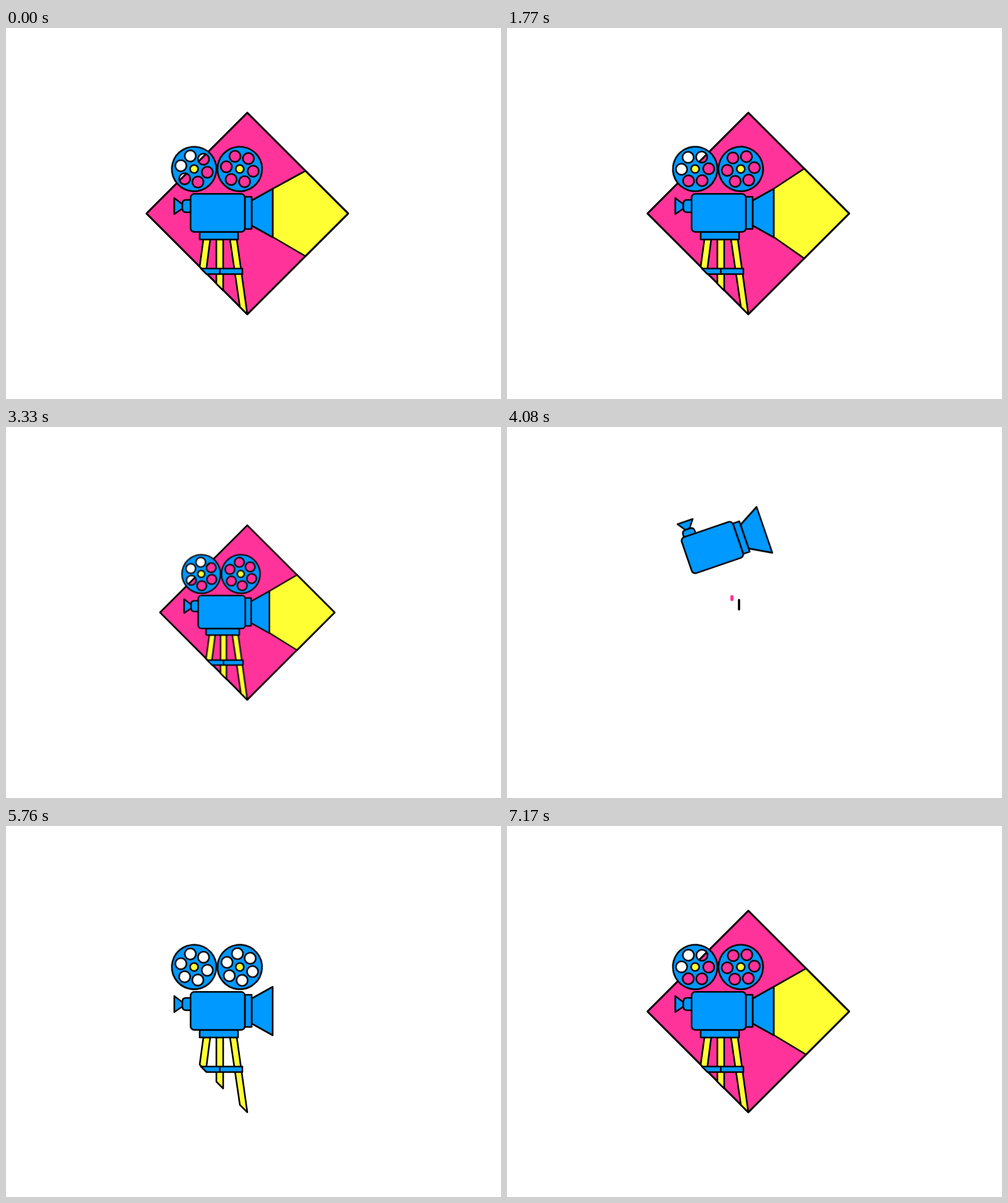
Animation of 800x600 px, one loop 7.2 s. Source, as an HTML page without scripts:

```html
<!DOCTYPE html>
<html lang="en">
<head>
<meta charset="utf-8">
<title>Film projector</title>
<style>
html, body { margin: 0; width: 100%; height: 100%; overflow: hidden; background: #fff; }
svg { display: block; width: 800px; height: 600px; }
.ink { stroke: #000; stroke-width: 2.6; stroke-linejoin: round; }
.blue { fill: #09f; }
.pink { fill: #f39; }
.yellow { fill: #ff3; }
.a { animation: 7.2s linear infinite; }

/* whole scene: shrinks away, then restarts */
.scene { animation-name: scene; transform-origin: 390px 300px; }
@keyframes scene {
  0%, 42.083% { transform: scale(1); animation-timing-function: ease-in-out; }
  43.5% { transform: scale(1.006); animation-timing-function: cubic-bezier(.5, 0, .8, .5); }
  50%, 53.74% { transform: scale(0); }
  53.75%, 100% { transform: scale(1); }
}

/* diamond and light beam */
.diamond { animation-name: diamond; transform-origin: 390px 300px; }
@keyframes diamond {
  0%, 50% { transform: scale(1); }
  50.01%, 91.25% { transform: scale(0); animation-timing-function: cubic-bezier(.2, .6, .3, 1); }
  94% { transform: scale(1.006); }
  95%, 100% { transform: scale(1); }
}
.beam { animation-name: beam; transform-origin: 431px 300px; }
@keyframes beam {
  0%, 50% { transform: scale(1); }
  50.01%, 92.5% { transform: scale(0); animation-timing-function: ease-out; }
  95%, 100% { transform: scale(1); }
}
.flicker { animation: flicker 102.857ms ease-in-out infinite alternate; }
@keyframes flicker {
  from { d: path("M431 260L484 231L553 300L484 369L431 338Z"); }
  to { d: path("M431 260L480 227L553 300L480 373L431 338Z"); }
}

/* camera jump */
.camera { animation-name: jump; transform-origin: 342px 299px; }
@keyframes jump {
  0%, 50% { transform: translate(0, 0) rotate(0deg) scale(1); }
  50.01%, 53.75% { transform: translate(10px, 182px) rotate(0deg) scale(0); animation-timing-function: cubic-bezier(.2, .5, .5, 1); }
  56.667% { transform: translate(-10.2px, -104px) rotate(-18.9deg) scale(1); animation-timing-function: ease-out; }
  57.5% { transform: translate(-10.2px, -107px) rotate(-19.5deg) scale(1); animation-timing-function: ease-in; }
  60.833% { transform: translate(0, 6px) rotate(9deg) scale(1); animation-timing-function: ease-in-out; }
  62.083% { transform: translate(0, -3px) rotate(-3deg) scale(1); animation-timing-function: ease-in-out; }
  63.75%, 100% { transform: translate(0, 0) rotate(0deg) scale(1); }
}
.eye { animation-name: eye; transform-origin: 314.5px 287.5px; }
@keyframes eye {
  0%, 50% { transform: rotate(0deg); }
  50.01%, 64.167% { transform: rotate(90deg); animation-timing-function: ease-in-out; }
  67% { transform: rotate(-7deg); }
  69%, 100% { transform: rotate(0deg); }
}
.trail { fill: none; stroke-linecap: round; opacity: 0; }
.t1 { stroke: #f39; stroke-width: 5; animation-name: trail1; }
.t2 { stroke: #000; stroke-width: 3.6; animation-name: trail2; }
@keyframes trail1 {
  0%, 54.2% { opacity: 0; d: path("M363.5 470V471"); }
  54.21% { opacity: 1; d: path("M363.5 470V471"); }
  55.417% { d: path("M363.5 340V400"); }
  56.667% { d: path("M363.5 274.5V279.5"); }
  57% { opacity: 1; d: path("M363.5 268V269"); }
  57.01%, 100% { opacity: 0; d: path("M363.5 268V269"); }
}
@keyframes trail2 {
  0%, 54.2% { opacity: 0; d: path("M375 484V485"); }
  54.21% { opacity: 1; d: path("M375 484V485"); }
  55.417% { d: path("M375 335V420"); }
  56.667% { d: path("M375 280V295.5"); }
  57.4% { opacity: 1; d: path("M375 270V271"); }
  57.41%, 100% { opacity: 0; d: path("M375 270V271"); }
}

/* tripod unfolds */
.tripod { animation-name: show; }
@keyframes show {
  0%, 50% { opacity: 1; }
  50.01%, 64.1% { opacity: 0; }
  64.11%, 100% { opacity: 1; }
}
.base { animation-name: base; }
@keyframes base {
  0%, 50%, 72.5%, 100% { d: path("M313 330L375 330L375 342L313 342Z"); }
  50.01%, 64.167% { d: path("M334 318L356 318L356 328L334 328Z"); }
  65.833% { d: path("M334 330L356 330L356 342L334 342Z"); }
  70.833% { d: path("M316 330L372 330L372 342L316 342Z"); }
}
.left { animation-name: left; }
@keyframes left {
  0%, 50%, 72.5%, 100% { d: path("M319 342L330 342L323 396L313 386Z"); }
  50.01%, 64.167% { d: path("M332 318L343 318L343 328L332 328Z"); }
  67.5% { d: path("M332 342L343 342L343 416L332 405Z"); }
  70.833% { d: path("M322 342L333 342L326 399L316 389Z"); }
}
.mid { animation-name: mid; }
@keyframes mid {
  0%, 50%, 67.5%, 100% { d: path("M340 342L351 342L351 424.5L340 413.5Z"); }
  50.01%, 64.167% { d: path("M340 318L351 318L351 328L340 328Z"); }
}
.right { animation-name: right; }
@keyframes right {
  0%, 50%, 72.5%, 100% { d: path("M362 342L373 342L390 463L378 451Z"); }
  50.01%, 64.167% { d: path("M347 318L358 318L358 328L347 328Z"); }
  67.5% { d: path("M347 342L358 342L361 434L350 423Z"); }
  70.833% { d: path("M358 342L369 342L384 458.5L372 446.5Z"); }
}
.brace { animation-name: brace; }
@keyframes brace {
  0%, 50%, 72.5%, 100% { opacity: 1; d: path("M315 389L382 389L382 398L324 398ZM345.5 389L345.5 398"); }
  50.01%, 67% { opacity: 0; d: path("M338 389L353 389L353 398L338 398ZM345.5 389L345.5 398"); }
  67.01% { opacity: 1; d: path("M338 389L353 389L353 398L338 398ZM345.5 389L345.5 398"); }
  70.833% { opacity: 1; d: path("M315 389L379 389L379 398L324 398ZM345.5 389L345.5 398"); }
}

/* reels pop up, then spin */
.rise { animation-name: rise; }
.late { animation-delay: .12s; }
@keyframes rise {
  0%, 50% { transform: translateY(0); }
  50.01%, 70% { transform: translateY(76px); }
  70.833% { transform: translateY(65px); animation-timing-function: ease-out; }
  73.333% { transform: translateY(-19px); animation-timing-function: ease-in-out; }
  75.417%, 100% { transform: translateY(0); }
}
.spin1 { animation-name: spin1; }
@keyframes spin1 {
  0% { transform: rotate(13.5deg); }
  50% { transform: rotate(1325.5deg); }
  50.01%, 88.75% { transform: rotate(14deg); animation-timing-function: ease-in; }
  90.833% { transform: rotate(34deg); }
  92.222% { transform: rotate(50deg); }
  99.583% { transform: rotate(240deg); }
  100% { transform: rotate(253.5deg); }
}
.spin2 { animation-name: spin2; }
@keyframes spin2 {
  0% { transform: rotate(9deg); }
  50% { transform: rotate(1321deg); }
  50.01%, 88.3% { transform: rotate(-40deg); animation-timing-function: ease-in; }
  90.833% { transform: rotate(-10deg); }
  99.583% { transform: rotate(236deg); }
  100% { transform: rotate(249deg); }
}
.whirl { animation-name: whirl; opacity: 0; }
@keyframes whirl {
  0%, 90% { opacity: 0; transform: rotate(184deg); }
  90.01% { opacity: 1; transform: rotate(184deg); }
  90.833% { transform: rotate(203deg); }
  92.2% { opacity: 1; transform: rotate(238deg); }
  92.21%, 100% { opacity: 0; transform: rotate(238deg); }
}
</style>
</head>
<body>
<svg viewBox="0 0 800 600">
  <defs>
    <g id="reel" class="ink">
      <path class="blue" fill-rule="evenodd" d="M36 0a36 36 0 1 0-72 0a36 36 0 1 0 72 0z
        M31 0a9 9 0 1 0-18 0a9 9 0 1 0 18 0z
        M20 19.05a9 9 0 1 0-18 0a9 9 0 1 0 18 0z
        M-2 19.05a9 9 0 1 0-18 0a9 9 0 1 0 18 0z
        M-13 0a9 9 0 1 0-18 0a9 9 0 1 0 18 0z
        M-2-19.05a9 9 0 1 0-18 0a9 9 0 1 0 18 0z
        M20-19.05a9 9 0 1 0-18 0a9 9 0 1 0 18 0z"/>
      <circle class="yellow" r="6.5"/>
    </g>
    <g id="dashes" fill="none">
      <circle r="41" stroke="#000" stroke-width="3.4" pathLength="360" stroke-dasharray="11 349"/>
      <circle r="45.5" stroke="#09f" stroke-width="1.8" pathLength="360" stroke-dasharray="11 349" transform="rotate(-4)"/>
    </g>
    <clipPath id="above"><rect x="200" y="100" width="300" height="165.5"/></clipPath>
    <clipPath id="rim"><rect x="200" y="263.6" width="300" height="2.4"/></clipPath>
  </defs>

  <g class="a scene">
    <g class="a diamond ink">
      <path class="pink" d="M390 137L553 300L390 463L227 300Z"/>
      <g class="a beam"><path class="yellow flicker" d="M431 260L484 231L553 300L484 369L431 338Z"/></g>
      <path fill="none" d="M390 137L553 300L390 463L227 300Z"/>
    </g>

    <g clip-path="url(#above)">
      <g class="a rise late"><g transform="translate(304 228)"><use class="a spin1" href="#reel"/></g></g>
      <g class="a rise"><g transform="translate(377.8 228)"><use class="a spin2" href="#reel"/></g></g>
    </g>
    <g clip-path="url(#rim)">
      <circle class="a rise late" cx="304" cy="228" r="37"/>
      <circle class="a rise" cx="377.8" cy="228" r="37"/>
    </g>
    <g transform="translate(304 228)"><use class="a whirl" href="#dashes"/></g>
    <g transform="translate(377.8 228) rotate(12)"><use class="a whirl" href="#dashes"/></g>

    <g class="a tripod ink">
      <path class="a left yellow" d="M319 342L330 342L323 396L313 386Z"/>
      <path class="a right yellow" d="M362 342L373 342L390 463L378 451Z"/>
      <path class="a mid yellow" d="M340 342L351 342L351 424.5L340 413.5Z"/>
      <path class="a brace blue" d="M315 389L382 389L382 398L324 398ZM345.5 389L345.5 398"/>
      <path class="a base blue" d="M313 330L375 330L375 342L313 342Z"/>
    </g>

    <path class="a trail t1" d="M363.5 470V471"/>
    <path class="a trail t2" d="M375 484V485"/>

    <g class="a camera ink blue">
      <g class="a eye">
        <path d="M285 285L272 275V301L285 292Z"/>
        <path d="M299 278h-8q-6 0-6 6v8q0 6 6 6h8z"/>
      </g>
      <path d="M397 279L431 260V338.5L397 319.5Z"/>
      <rect x="386" y="273" width="11" height="52"/>
      <rect x="298.3" y="268.3" width="87.7" height="61.5" rx="6"/>
    </g>
  </g>
</svg>
</body>
</html>
```
